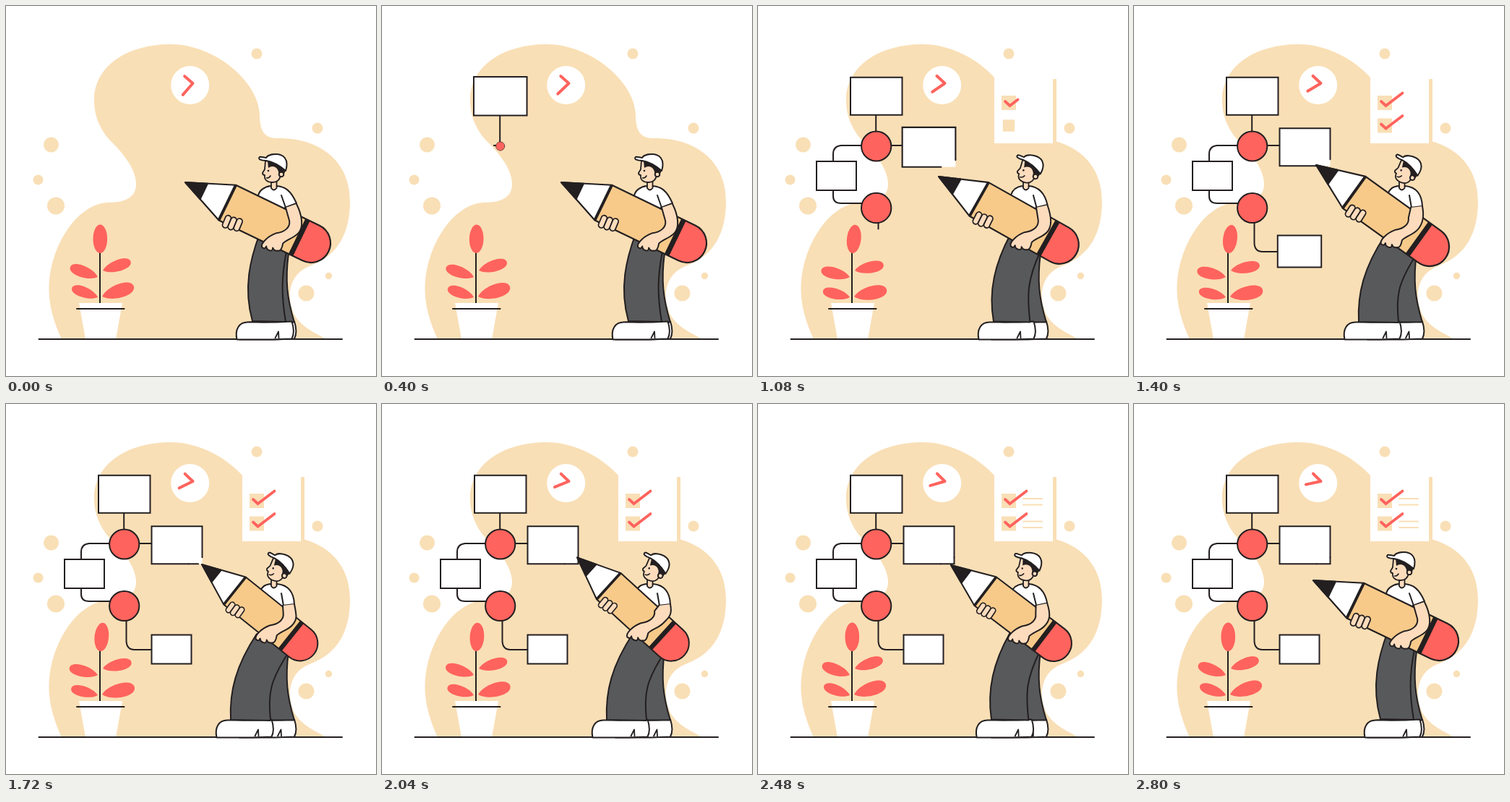
Write an HTML page with a canvas that moves like this. It is 512 px wide and 512 px high and loops after 2.88 s.

```html
<!DOCTYPE html>
<html lang="en">
<head>
<meta charset="utf-8">
<title>Planning</title>
<style>
  html, body { margin: 0; width: 100%; height: 100%; overflow: hidden; background: #fff; }
  canvas { display: block; width: 512px; height: 512px; }
</style>
</head>
<body>
<canvas id="stage" width="512" height="512"></canvas>
<script>
const ctx = document.getElementById('stage').getContext('2d');
const LOOP = 2880, STEP = 40;
const INK = '#231f20', SAND = '#f9dfb6', RED = '#ff635d', WHITE = '#fff',
      SKIN = '#fddcbd', WOOD = '#f7ca8a', GREY = '#58595b';

// time, pencil tip x y, pencil cap x y, stride, head tilt
const POSES = [
  [0, 248, 244, 422, 328, 0, 0],
  [760, 248, 244, 422, 328, 0, 0],
  [1080, 250, 236, 417, 330, .5, 12],
  [1400, 252, 220, 409, 333, 1, 18],
  [1720, 271, 222, 407, 331, 1, 18],
  [2080, 270, 212, 400, 331, 1, 18],
  [2240, 270, 212, 400, 331, 1, 18],
  [2480, 267, 223, 409, 331, .6, 7.5],
  [2760, 248, 244, 422, 328, 0, 0],
  [LOOP, 248, 244, 422, 328, 0, 0]
];
const SWAY = [[0, 0], [400, 1], [1080, 6.5], [1320, 7.2], [2040, 3], [2480, 0], [LOOP, 0]];

const rad = deg => deg * Math.PI / 180;
const lerp = (a, b, u) => a + (b - a) * u;
const progress = (t, from, to) => Math.min(1, Math.max(0, (t - from) / (to - from)));

// Monotone cubic interpolation through keyframes
function track(keys, t) {
  let i = 1;
  while (i < keys.length - 1 && keys[i][0] < t) i++;
  const a = keys[i - 1], b = keys[i], span = b[0] - a[0], u = (t - a[0]) / span;
  const slope = (k, c) => keys[k] && keys[k - 1]
    ? (keys[k][c] - keys[k - 1][c]) / (keys[k][0] - keys[k - 1][0]) : 0;
  const tangent = (k, c) => {
    const p = slope(k, c), q = slope(k + 1, c);
    return p * q > 0 ? 2 * p * q / (p + q) : 0;
  };
  return a.slice(1).map((v, n) => {
    const c = n + 1;
    return lerp(v, b[c], u * u * (3 - 2 * u))
      + span * u * (1 - u) * ((1 - u) * tangent(i - 1, c) - u * tangent(i, c));
  });
}

// Scale-in with overshoot
function pop(t, start, duration = 400) {
  const v = progress(t, start, start + duration) - 1;
  return v === -1 ? 0 : 1 + 2.7 * v ** 3 + 1.7 * v * v;
}

function shape(d, fill, stroke, width = 2) {
  const path = new Path2D(d);
  if (fill) { ctx.fillStyle = fill; ctx.fill(path); }
  if (stroke) { ctx.strokeStyle = stroke; ctx.lineWidth = width; ctx.stroke(path); }
}

function disc(x, y, r, fill, stroke) {
  ctx.beginPath();
  ctx.arc(x, y, r, 0, 7);
  ctx.fillStyle = fill;
  ctx.fill();
  if (stroke) { ctx.strokeStyle = stroke; ctx.lineWidth = 2; ctx.stroke(); }
}

function trim(d, length, u, color = INK, width = 2) {
  if (u <= 0) return;
  ctx.save();
  if (u < 1) ctx.setLineDash([length * u, 999]);
  shape(d, null, color, width);
  ctx.restore();
}

function place(x, y, angle, scale, draw) {
  if (scale <= 0) return;
  ctx.save();
  ctx.translate(x, y);
  ctx.rotate(angle);
  ctx.scale(scale, scale);
  draw();
  ctx.restore();
}

function box(x, y, w, h, scale, fill = WHITE, stroke = INK) {
  if (scale <= 0) return;
  const W = w * scale, H = h * scale;
  shape(`M${x + (w - W) / 2},${y + (h - H) / 2}h${W}v${H}h${-W}z`, fill, stroke);
}

function backdrop() {
  shape('M77,461C63,430 55,400 62,365C72,315 105,274 140,272C160,272 180,268 180,246C180,220 150,192 143,185C132,172 122,155 122,130C122,85 165,53 228,53C290,53 350,106 351,150C351,172 357,183 375,183C435,182 476,215 476,270C476,335 440,352 420,360C395,370 388,395 396,420C402,440 425,452 444,461Z', SAND);
  [[347, 66, 7.5], [431, 169, 7.5], [62.5, 192, 10.5], [44.5, 240.5, 7],
   [69, 276.5, 12], [446.5, 373.5, 4.7], [415.5, 397.5, 11]]
    .forEach(([x, y, r]) => disc(x, y, r, SAND));
}

function clock(t) {
  disc(254.7, 109.5, 26.5, WHITE);
  const minute = rad(131 + t * .0132), hour = rad(221 + t * .0015);
  const end = (a, r) => `${258.5 + r * Math.cos(a)},${107 + r * Math.sin(a)}`;
  shape(`M${end(hour, 15)}L258.5,107L${end(minute, 21)}`, null, RED, 4);
}

function checklist(t) {
  place(370, 145, 0, pop(t, 620, 300), () => {
    shape('M38,-44h5v89h-5z', SAND);
    shape('M-43,-45h81v90h-81z', WHITE);
  });
  [[860, 960, 0], [1030, 1120, 31.5]].forEach(([boxStart, tickStart, y]) => {
    box(337, 124 + y, 20, 20, pop(t, boxStart, 200), SAND, null);
    trim(`M342,${132 + y}L348.5,${138 + y}L371.5,${120.5 + y}`, 38, progress(t, tickStart, tickStart + 200), RED, 3.8);
    [131, 139.5].forEach((lineY, n) => {
      const start = 2120 + n * 80 + y * 2;
      trim(`M367,${lineY + y}h26`, 26, progress(t, start, start + 200), SAND);
    });
  });
}

function flowchart(t) {
  trim('M163.2,151V194', 43, progress(t, 280, 400));
  trim('M164,193H115Q104,194 104,205V216', 76, progress(t, 370, 620));
  trim('M104,254V263Q104,273 115,273H164', 74, progress(t, 660, 860));
  trim('M164,193H202', 38, progress(t, 640, 780));
  trim('M166.5,280V328Q167,340 178,340H202', 90, progress(t, 1020, 1210));
  box(128, 98.7, 71.5, 52, pop(t, 60));
  box(81, 215, 55, 40, pop(t, 600));
  box(201.5, 319.5, 55, 40, pop(t, 1160));
  place(236.5, 195.3, 0, pop(t, 768), () => {
    shape('M-35,-26h70v52h-70z', WHITE);
    shape('M35,17V-26H-35V26H16', null, INK);
    trim('M16,26H35V17', 28, progress(t, 1400, 2060));
  });
  [[194, 372], [279.5, 700]].forEach(([y, start]) =>
    place(163.7, y, 0, pop(t, start), () => disc(0, 0, 20.6, RED, INK)));
}

function plant(t) {
  const [sway] = track(SWAY, t);
  shape('M130,340V411', null, INK);
  place(130, 344, rad(sway), 1, () => {
    ctx.beginPath();
    ctx.ellipse(.3, -21.7, 9.8, 19.7, 0, 0, 7);
    ctx.fillStyle = RED;
    ctx.fill();
  });
  [[127, 375, 200 - sway, 40.5, 7.3], [134, 366, sway - 18, 40.5, 7.3],
   [127, 403, 200 - sway, 38, 6.8], [133, 402, sway - 18, 46, 8.8]]
    .forEach(([x, y, angle, l, w]) => place(x, y, rad(angle), 1, () =>
      shape(`M0,0C${l * .25},${-w * 1.4} ${l},${-w * 1.5} ${l},0C${l},${w * 1.5} ${l * .25},${w * 1.4} 0,0Z`, RED)));
  shape('M101,411H161L152,461H110Z', WHITE);
  shape('M98,419H163.5', null, INK);
}

function shoe(x) {
  place(x, 461.5, 0, 1, () => {
    shape('M1,0C-2,-14 4,-24 16,-24C32,-24 44,-23 77,-25C80,-16 80,-7 77,-1L50,0Z', WHITE, INK);
    shape('M54,-2L58.5,-11L59,-2', null, INK, 1.8);
  });
}

function legs(stride) {
  const p = (x0, y0, x1, y1) => `${lerp(x0, x1, stride)},${lerp(y0, y1, stride)} `;
  shoe(322);
  shape('M358,325L391,342C386,380 389,405 399,437.5H363Z', GREY, INK);
  shoe(lerp(318.5, 290.5, stride));
  shape('M' + p(351, 315, 347, 318) + 'C' + p(338, 350, 318, 362) + p(328, 390, 309, 398) + p(341, 436, 311, 437)
    + 'L' + p(387, 437, 366, 438) + 'C' + p(381, 400, 363, 400) + p(381, 375, 364, 385) + p(388, 340, 392, 342), GREY, INK);
}

function torso(stride) {
  const p = (x0, y0, x1, y1) => `${lerp(x0, x1, stride)},${lerp(y0, y1, stride)} `;
  shape('M356,305L' + p(349, 263, 351, 260) + 'C' + p(350, 255, 355, 252) + '358,250 366,249Q371,256 375,249C386,250 '
    + p(394, 255, 398, 256) + p(402, 273, 399, 277) + 'L' + p(386, 279, 383, 279) + 'L383,305Z', WHITE, INK);
  shape('M' + p(387, 279, 384, 279) + 'L' + p(381, 262, 381, 262), null, INK);
  shape('M367,241V252Q370.5,257 374.5,252V241Z', SKIN, INK, 1.8);
}

function head(tilt) {
  const shift = tilt / 18;
  place(371 + shift, 245 + shift, rad(tilt), 1, () => {
    ctx.translate(-371, -245);
    shape('M359,214L358,226L355,231Q355,234 358,234C357,241 362,244 369,244C376,244 379,240 380,234L386,228L372,216Z', SKIN, INK, 1.8);
    shape('M362,214L363,224Q369,220 374,224Q378,228 377,234L384,235L387,227C380,220 372,216 362,214Z', INK);
    disc(381, 233, 3.3, SKIN, INK);
    disc(363, 228, 1.3, INK);
    shape('M360.5,238Q364,238.5 366,235', null, INK, 1.6);
    shape('M351,209C348,212 353,214 360,214C372,216 380,222 387,228C392,212 384,205 373,205C365,205 361,208 360,210C357,210 353,208 351,209Z', WHITE, INK);
  });
}

function pencil() {
  const outline = 'M64.6,-27H193A27,27 0 0 1 193,27H64.6L0,0Z';
  shape(outline, WOOD);
  shape('M0,0L64.6,-27V27Z', WHITE);
  shape('M176,-27H193A27,27 0 0 1 193,27H176Z', RED);
  shape('M0,0L28.7,-12V12Z', INK, INK);
  ctx.lineCap = 'butt';
  shape('M64.6,-27V27', null, INK, 4);
  shape('M175,-27V27', null, INK, 7);
  shape(outline, null, INK, 2.2);
}

function fingers() {
  [[75, 18], [83, 17], [91, 15]].forEach(([x, y]) =>
    place(x, y, rad(-3), 1, () => shape('M-4,11V1A4,4 0 0 1 4,1V11A4,4 0 0 1 -4,11Z', SKIN, INK, 1.8)));
}

// Drawn around the gripping hand; the two ends follow the sleeve
function arm(stride, x, y) {
  const sleeve = (x0, y0, x1, y1) => `${lerp(x0, x1, stride) - x},${lerp(y0, y1, stride) - y} `;
  place(x, y, 0, 1, () => shape('M' + sleeve(402, 274, 399, 277) + 'C' + sleeve(410, 290, 402, 292)
    + '45,-22 37,-14C30,-7 20,-5 16,0C15,6 13,11 9,10Q4,11 2,6Q2,12 -4,9Q-7,8 -7,4Q-9,9 -13,5'
    + 'C-15,0 -5,-10 6,-14C20,-16 26,-23 25,-31L' + sleeve(387, 279, 383, 279), SKIN, INK));
}

function man(t) {
  const [tipX, tipY, capX, capY, stride, tilt] = track(POSES, t);
  const angle = Math.atan2(capY - tipY, capX - tipX);
  const scale = Math.hypot(capX - tipX, capY - tipY) / 193;
  legs(stride);
  torso(stride);
  head(tilt);
  place(tipX, tipY, angle, scale, () => { pencil(); fingers(); });
  const reach = 146 * scale, grip = angle + rad(9.6);
  arm(stride, tipX + reach * Math.cos(grip), tipY + reach * Math.sin(grip));
}

function frame(now) {
  const t = Math.min(LOOP - 2 * STEP, Math.floor(now % LOOP / STEP) * STEP);
  ctx.fillStyle = WHITE;
  ctx.fillRect(0, 0, 512, 512);
  ctx.lineCap = 'round';
  ctx.lineJoin = 'round';
  backdrop();
  clock(t);
  ctx.lineJoin = 'miter';
  checklist(t);
  flowchart(t);
  ctx.lineJoin = 'round';
  plant(t);
  shape('M45.5,461H465', null, INK);
  man(t);
  requestAnimationFrame(() => frame(performance.now()));
}
frame(0);
</script>
</body>
</html>
```
